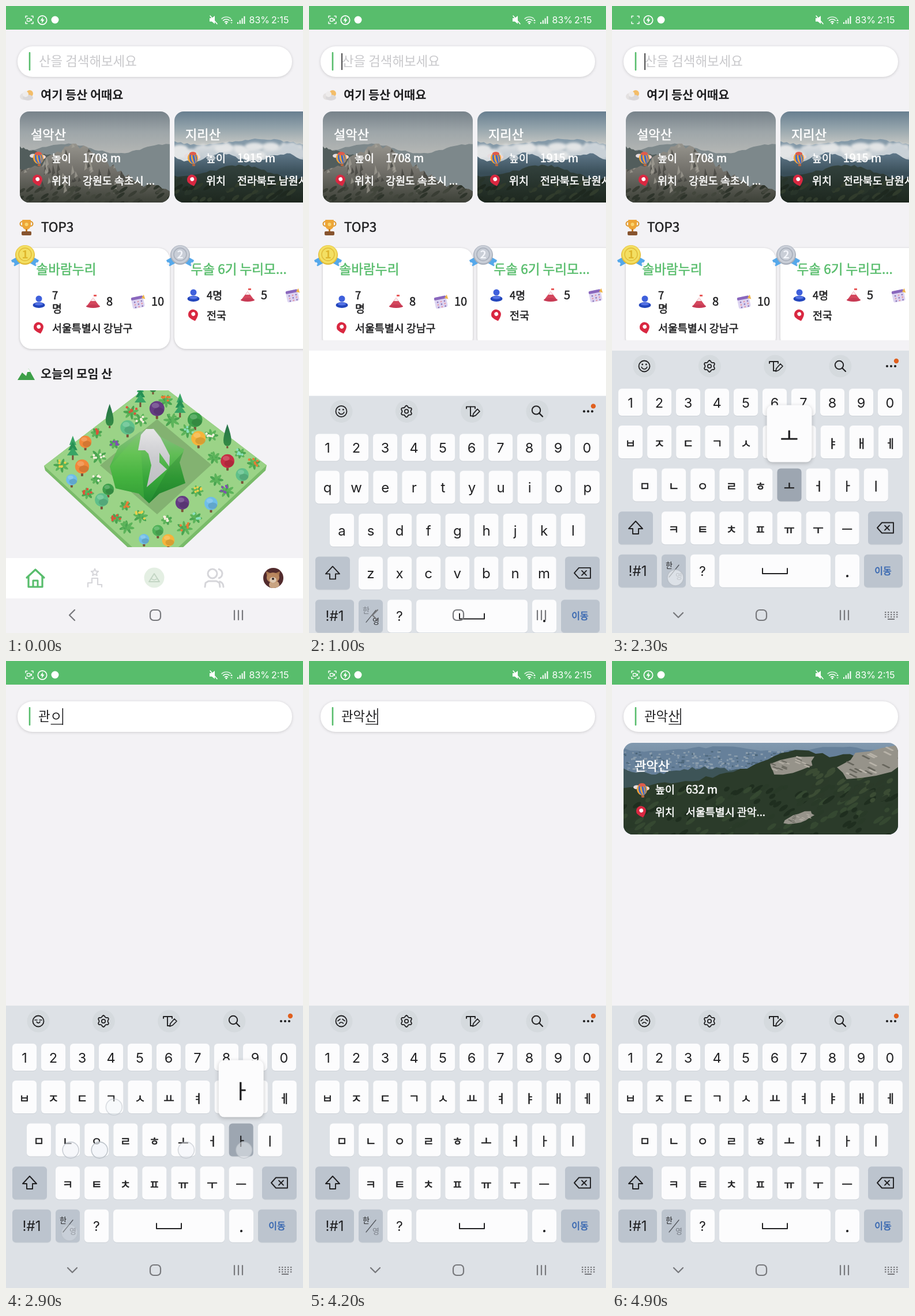
Animation of 515 by 1088 pixels, one loop 5000 ms. Source, as an HTML page with a canvas:

```html
<!DOCTYPE html>
<html lang="ko">
<head>
<meta charset="utf-8">
<title>산 검색</title>
<style>
html, body { margin: 0; width: 100%; height: 100%; overflow: hidden; background: #f3f2f5; }
canvas { display: block; width: 515px; height: 1088px; }
</style>
</head>
<body>
<canvas id="stage"></canvas>
<script>
const W = 515, H = 1088, LOOP = 5000, STEP = 100;
const cv = document.getElementById('stage'), g = cv.getContext('2d');
const dpr = window.devicePixelRatio || 1;
cv.width = W * dpr; cv.height = H * dpr;

const KR = '"Noto Sans CJK KR","Noto Sans CJK",sans-serif', LAT = 'Inter,"Noto Sans",sans-serif';
const BG = '#f3f2f5', GREEN = '#58bd6c', INK = '#202022', KEYBG = '#dde1e6', DARK = '#bcc4ce';

// drawing helpers
function paint(fill, stroke, w = 2) {
  if (fill) { g.fillStyle = fill; g.fill(); }
  if (stroke) { g.strokeStyle = stroke; g.lineWidth = w; g.stroke(); }
}
function path(p, close) {
  g.beginPath();
  for (let i = 0; i < p.length; i += 2) g.lineTo(p[i], p[i + 1]);
  if (close) g.closePath();
}
function poly(p, fill, stroke, w) { path(p, true); paint(fill, stroke, w); }
function line(p, color, w) { path(p); paint(null, color, w); }
function dot(x, y, r, fill, stroke, w) { g.beginPath(); g.arc(x, y, r, 0, 7); paint(fill, stroke, w); }
function oval(x, y, rx, ry, fill, rot = 0) { g.beginPath(); g.ellipse(x, y, rx, ry, rot, 0, 7); paint(fill); }
function arc(x, y, r, a, b, color, w) { g.beginPath(); g.arc(x, y, r, a, b); paint(null, color, w); }
function box(x, y, w, h, r, fill, stroke, lw) { g.beginPath(); g.roundRect(x, y, w, h, r); paint(fill, stroke, lw); }
// closed outline from a radius per angle, starting at the top
function radial(x, y, n, radius) {
  const p = [];
  for (let i = 0; i < n; i++) {
    const a = i / n * 2 * Math.PI, r = radius(i, a);
    p.push(x + r * Math.sin(a), y - r * Math.cos(a));
  }
  return p;
}
// weight 500 is the regular face, slightly thickened
function text(s, x, y, size, color, weight = 400, font = KR, align = 'left') {
  g.font = `${weight === 500 ? 400 : weight} ${size}px ${font}`; g.fillStyle = color; g.textAlign = align; g.fillText(s, x, y);
  if (weight === 500) { g.strokeStyle = color; g.lineWidth = 0.55; g.strokeText(s, x, y); }
}
const label = (s, x, y, size, weight, font, color = INK) => text(s, x, y, size, color, weight, font, 'center');
function fade(y0, y1, ...colors) {
  const gr = g.createLinearGradient(0, y0, 0, y1);
  colors.forEach((c, i) => gr.addColorStop(i / (colors.length - 1), c));
  return gr;
}
function shadowed(blur, dy, alpha, fn) {
  g.save(); g.shadowColor = `rgba(0,0,0,${alpha})`; g.shadowBlur = blur * dpr; g.shadowOffsetY = dy * dpr; fn(); g.restore();
}
function clipped(x, y, w, h, r, fn) {
  g.save(); g.beginPath(); g.roundRect(x, y, w, h, r); g.clip(); fn(); g.restore();
}
function at(x, y, fn, rot = 0) { g.save(); g.translate(x, y); g.rotate(rot); fn(); g.restore(); }
function rng(seed) { return () => (seed = (seed * 16807) % 2147483647) / 2147483647; }
const bump = (u, mid, width) => Math.exp(-(((u - mid) / width) ** 2));

// small colour icons, centred
function pin(x, y) {
  at(x, y, () => {
    g.beginPath(); g.arc(0, -2, 8.5, Math.PI * 0.88, Math.PI * 0.12); g.quadraticCurveTo(6, 5, 0, 10); g.quadraticCurveTo(-6, 5, -8, 1);
    paint('#d92841'); dot(0.5, -2.5, 3.4, '#fff');
  }, -0.3);
}
function balloon(x, y) {
  at(x, y, () => {
    oval(-8, -5, 6, 3.5, '#e6dcdf'); oval(9, -3, 5, 3.5, '#f0d6d0');
    for (let i = 0; i < 4; i++) oval(1 + i * 0.6, -1, 9 - i * 2.4, 10, i % 2 ? '#4169c6' : '#f0a338', -0.2);
    oval(1, -9, 6, 3, '#e05c4b'); box(0, 9, 5, 4, 1, '#b3653f');
  });
}
function person(x, y) {
  dot(x, y - 5, 5.5, '#3f60dc'); oval(x, y + 6, 10.5, 5, '#2346bc'); oval(x, y + 4, 7, 2.5, '#5573e6');
}
function peak(x, y) {
  poly([x - 12, y + 9, x, y - 7, x + 12, y + 9], '#d4475d'); oval(x, y + 8, 12, 3, '#c73a54');
  poly([x - 4, y - 1, x, y - 7, x + 4, y - 1], '#fbe9ec'); box(x + 1, y - 12, 5, 3, 0, '#e85b5b');
}
function calendar(x, y) {
  at(x, y, () => {
    box(-11, -9, 21, 20, 3, '#ddd4f1'); box(-11, -9, 21, 5, 2, '#8a67bd');
    for (let i = 0; i < 9; i++) dot(-6 + (i % 3) * 6, (i / 3 | 0) * 4.5, 1.4, i % 2 ? '#e59ba9' : '#8d79ba');
    poly([7, -5, 12, -10, 13, -2], '#eeb54a');
  }, -0.2);
}
function medal(x, color, rim, ink, n) {
  for (const s of [-1, 1]) at(x + s * 13, 443, () => { box(-9, -7, 18, 12, 1, '#55a8ea'); dot(s * 9, 0, 2.5, BG); }, s * 0.5);
  dot(x, 432, 17, rim); dot(x, 431, 15.5, color); dot(x, 431, 11, null, rim, 1.5);
  label(n, x, 438, 19, 700, KR, ink);
}
function headIcons() {
  dot(41, 152, 6, '#f3bd69'); oval(31, 157, 7, 6, '#e4e1e1'); oval(38, 159, 9, 5, '#dad8da'); dot(34, 153, 5, '#eeecec');
  for (const s of [-1, 1]) dot(35.5 + s * 7, 378, 4, null, '#dc962c', 2);
  box(28, 371, 15, 17, [1, 1, 8, 8], '#eda536'); box(34, 387, 3, 6, 0, '#c57b22'); box(27, 391, 17, 7, 2, '#87542f'); dot(35.5, 379, 3, '#f9d46f');
  poly([20, 649, 28, 636, 35, 642, 39, 629, 50, 649], '#3d9f48'); poly([36, 635, 39, 629, 42, 635], '#fff');
}

// landscape pictures
function hill(x, w, bottom, seed, jag, fill, height) {
  const r = rng(seed), p = [x, bottom], n = 40;
  for (let i = 0; i <= n; i++) p.push(x + w * i / n, height(i / n) + (r() - 0.5) * jag);
  poly([...p, x + w, bottom], fill);
  path([...p, x + w, bottom], true);
}
function specks(x, y, w, h, n, size, colors, seed, rot = -0.6) {
  const r = rng(seed);
  for (let i = 0; i < n; i++) oval(x + r() * w, y + r() * h, size * (0.6 + r()), size * 0.45, colors[i % colors.length], rot);
}
function rockView() {
  box(24, 183, 260, 158, 0, fade(183, 255, '#77828a', '#9ea6a9', '#b4b6b4'));
  hill(24, 260, 341, 7, 3, '#7d888b', u => 247 + 8 * Math.sin(u * 9 + 2));
  hill(24, 130, 341, 12, 5, '#525d5c', u => 246 + u * 34);
  g.save();
  hill(24, 260, 341, 40, 13, fade(236, 341, '#98968f', '#706e68', '#3c4037'), u => 297 + 20 * u - 62 * bump(u, 0.39, 0.27));
  g.clip();
  const r = rng(31);
  for (let i = 0; i < 75; i++) {
    const x = 24 + r() * 200, y = 236 + r() * 75, h = 6 + r() * 16;
    poly([x, y, x + 4, y + h * 0.7, x - 2, y + h], i % 2 ? 'rgba(62,62,58,.65)' : 'rgba(172,168,158,.6)');
  }
  specks(24, 312, 260, 34, 55, 6, ['#2e342b', '#42463c', '#393d34'], 5);
  g.restore();
}
function cloudView() {
  box(292, 183, 223, 158, 0, fade(183, 240, '#687f90', '#93a3ab', '#c4c6c3'));
  hill(292, 223, 341, 4, 3, '#8499a8', u => 236 + 5 * Math.sin(u * 7));
  g.save(); g.filter = 'blur(2px)';
  hill(292, 223, 341, 15, 7, fade(238, 275, '#dde0e2', '#b4c1ca'), u => 244 + 6 * Math.sin(u * 11 + 1));
  specks(292, 244, 223, 20, 24, 16, ['#c9d1d7', '#e3e5e6'], 22, 0);
  g.restore();
  hill(292, 223, 341, 19, 4, fade(255, 290, '#60788a', '#394e58'), u => 263 + 7 * Math.sin(u * 13));
  hill(292, 223, 341, 27, 4, fade(272, 341, '#34433f', '#1d271e'), u => 297 - 24 * bump(u, 0.52, 0.28) + 6 * u);
  specks(292, 302, 223, 40, 50, 7, ['#1e281f', '#303b2c', '#28342a'], 14);
}
function boulder(x, y, rx, ry, seed) {
  const r = rng(seed);
  at(x, y, () => {
    g.scale(rx, ry);
    poly(radial(0, 0, 14, () => 0.7 + r() * 0.4), '#96938a');
    for (let i = 0; i < 16; i++) {
      const a = r() * 1.4 - 0.8, b = r() * 1.2 - 0.7;
      line([a, b, a + 0.15, b + 0.3], i % 2 ? '#67665d' : '#b8b3a9', 0.06);
    }
  }, -0.25);
}
function cityView() {
  box(20, 142, 476, 159, 0, fade(142, 210, '#8299af', '#728ba1', '#566d79'));
  hill(20, 476, 301, 6, 4, '#66809a', u => 153 + 4 * Math.sin(u * 14));
  const r = rng(77);
  for (let i = 0; i < 260; i++) box(20 + r() * 300, 155 + r() * 46, 2 + r() * 4, 1.5 + r() * 2, 0, i % 3 ? '#8c9ead' : '#4c667a');
  hill(20, 280, 301, 10, 7, '#3d5457', u => 190 + 5 * Math.sin(u * 9));
  hill(20, 476, 301, 23, 7, '#2b3b2a', u => 224 - 70 * u - 24 * bump(u, 0.6, 0.14));
  specks(20, 218, 476, 90, 150, 8, ['#1f2e1f', '#354831', '#293a28'], 3);
  specks(330, 182, 166, 60, 40, 8, ['#2b3a29', '#3b4c34'], 9);
  boulder(310, 180, 46, 17, 8); boulder(452, 175, 62, 27, 17); boulder(325, 272, 28, 10, 5);
}
function facts(x, y, name, height, place, tx = 54) {
  text(name, x, y, 22.1, '#fff', 500);
  balloon(x + 12, y + 34); pin(x + 12, y + 72);
  [['높이', height], ['위치', place]].forEach(([k, v], i) => {
    text(k, x + 36, y + 40 + i * 39, 18.4, '#fff', 500);
    text(v, x + 36 + tx, y + 40 + i * 39, i ? 18.4 : 19.6, '#fff', 500);
  });
}

// garden: three square rings of plants around the crystal hill
function tree(x, y, r, c) {
  box(x - 2, y + r * 0.5, 4, r * 0.9, 1, '#7b5138');
  dot(x, y, r, c); oval(x + r * 0.25, y + r * 0.35, r * 0.7, r * 0.5, 'rgba(0,0,0,.12)'); oval(x - r * 0.2, y - r * 0.4, r * 0.5, r * 0.35, 'rgba(255,255,255,.18)');
}
function cone(x, y, h) {
  box(x - 1.5, y, 3, 4, 0, '#7b5138');
  g.beginPath(); g.moveTo(x, y - h); g.quadraticCurveTo(x + h * 0.36, y, x, y); g.quadraticCurveTo(x - h * 0.36, y, x, y - h);
  paint(fade(y - h, y, '#26734a', '#338b43'));
}
function pine(x, y) {
  box(x - 1.5, y - 5, 3, 9, 0, '#7b5138');
  for (let i = 0; i < 3; i++) poly([x, y - 38 + i * 10, x + 6 + i * 2, y - 22 + i * 9, x - 6 - i * 2, y - 22 + i * 9], i % 2 ? '#279054' : '#38a565');
}
function plant(x, y, r, bloom, rand) {
  for (let i = 0; i < 7; i++) { const a = i * 0.9 + r; oval(x + Math.cos(a) * r * 0.5, y + Math.sin(a) * r * 0.4, r * 0.55, 2.4, i % 2 ? '#4aa551' : '#5cb45a', a); }
  for (let i = 0; i < 6; i++) dot(x + (rand() - 0.5) * r * 1.4, y + (rand() - 0.7) * r, 2.1, bloom);
}
const CROWNS = ['#3c9e4a', '#f1883a', '#5fc08a', '#653c83', '#4eb157', '#6fbee9', '#f6b43b', '#c62d44'];
const BLOOMS = ['#5cb45a', '#e77b36', '#8050b0', '#ecd04c', '#8be0bd', '#dd523a', '#f6f0dc'];
function garden() {
  poly([66, 798, 259, 650, 452, 797, 450, 806, 259, 984, 68, 806], '#79bb69');
  poly([66, 798, 259, 650, 452, 797, 259, 976], '#9bd387');
  poly([163, 797, 262, 717, 356, 796, 262, 882], '#83b271');
  const rand = rng(4), spots = [];
  for (const [size, n] of [[0.88, 28], [0.66, 20]]) for (let i = 0; i < n; i++) {
    const side = Math.floor(i * 4 / n), k = (i * 4 / n % 1) * 2 - 1;
    const turn = [[k, -1], [1, k], [-k, 1], [-1, -k]][side].map(v => v * size + (rand() - 0.5) * 0.08);
    const v = (turn[0] + turn[1]) / 2;
    spots.push({ x: 259 + 96.5 * (turn[0] - turn[1]), y: 798 + v * (v < 0 ? 148 : 178), kind: i % 5, back: side % 3 === 0 && size > 0.8 });
  }
  spots.sort((a, b) => a.y - b.y).forEach(({ x, y, kind, back }, i) => {
    if (kind === 0 && back) cone(x, y + 5, 38);
    else if (kind === 2 && back) pine(x, y + 5);
    else if (kind % 3 === 0) tree(x, y - 5, 9 + rand() * 4, CROWNS[i % CROWNS.length]);
    else plant(x, y, 9 + rand() * 5, BLOOMS[i % BLOOMS.length], rand);
  });
  const rock = [180, 799, 195, 765, 232, 739, 256, 733, 269, 748, 309, 769, 301, 792, 311, 828, 266, 846, 248, 863, 230, 846, 190, 837];
  poly(rock, fade(735, 860, '#8fbd8a', '#62bd57', '#38a83a', '#238c31'));
  g.save(); path(rock, true); g.clip();
  poly([180, 799, 232, 739, 240, 863, 190, 837], 'rgba(110,215,80,.22)');
  poly([283, 800, 320, 760, 311, 840, 248, 863], 'rgba(10,80,25,.18)');
  g.restore();
  poly([229, 771, 234, 744, 243, 734, 256, 734, 268, 749, 284, 780, 283, 799, 266, 775, 266, 792, 279, 804, 244, 835, 252, 797, 247, 777, 241, 771], fade(734, 835, '#e6e6e7', '#cbcbcf', '#bebfc2'));
}

function statusBar(t) {
  box(0, 0, W, 41, 0, GREEN);
  for (const a of [-1, 1]) for (const b of [-1, 1]) line([40.5 + a * 6.5, 24 + b * 3.5, 40.5 + a * 6.5, 24 + b * 6.5, 40.5 + a * 3.5, 24 + b * 6.5], '#fff', 1.4);
  const m = t % 1000;
  if (m < 300 || m >= 800) { box(36.5, 21.5, 5.5, 5, 1, null, '#fff', 1.3); poly([43, 23, 45, 21.5, 45, 26.5, 43, 25], '#fff'); }
  dot(63, 24.5, 7.7, null, '#fff', 1.7); poly([64, 19, 59.5, 25.5, 62.5, 25.5, 62, 30, 66.5, 23.5, 63.5, 23.5], '#fff');
  dot(85, 24, 6.5, '#fff');
  poly([353, 21, 357, 21, 362, 17, 362, 31, 357, 27, 353, 27], '#fff'); line([354, 17, 366, 31], '#fff', 1.6);
  for (const r of [4, 8, 12]) arc(382, 31, r, -2.3, -0.85, r < 12 ? '#fff' : 'rgba(255,255,255,.75)', 1.6);
  dot(382, 30, 1.6, '#fff'); poly([389, 26, 391, 23, 393, 26], '#fff'); poly([389, 28, 391, 31, 393, 28], 'rgba(255,255,255,.6)');
  for (let i = 0; i < 4; i++) box(401 + i * 3.8, 28 - i * 3.4, 2, 3 + i * 3.4, 0.5, '#fff');
  text('83%', 421.5, 29.5, 16, '#fff', 400, LAT); text('2:15', 460, 29.5, 16, '#fff', 400, LAT);
}

function club(x, name, members, peaks, days, place) {
  const rows = members.length, y = 491 + rows * 11, low = y + 24 + rows * 11;
  shadowed(4, 1, 0.2, () => box(x, 420, 260, 175, 20, '#fff'));
  text(name, x + 28.5, 465, 22.6, GREEN, 500);
  members.forEach((s, i) => text(s, x + 56, y + 7 + (i * 2 - rows + 1) * 11.5, 18.4, INK, 500));
  person(x + 33, y); peak(x + 127, y); calendar(x + 205, y); pin(x + 33, low);
  text(peaks, x + 150, y + 7, 20, INK, 500); text(days, x + 228, y + 7, 20, INK, 500);
  text(place, x + 56, low + 6.5, 18.4, INK, 500);
}
function home(full) {
  g.save();
  g.beginPath(); g.rect(0, 130, W, full ? 828 : 450); g.clip();
  headIcons();
  text('여기 등산 어때요', 60, 162, 20.8, INK, 700);
  clipped(24, 183, 260, 158, 16, rockView); clipped(292, 183, 260, 158, 16, cloudView);
  facts(43, 231, '설악산', '1708 m', '강원도 속초시 ...'); facts(311, 231, '지리산', '1915 m', '전라북도 남원시 ...');
  text('TOP3', 61, 392, 22.5, INK, 500);
  club(24, '솔바람누리', ['7', '명'], '8', '10', '서울특별시 강남구');
  club(292, '두솔 6기 누리모...', ['4명'], '5', '12', '전국');
  medal(33, '#f3df62', '#e3bd3a', '#dfb62d', '1'); medal(302, '#c9ced7', '#a8afbb', '#f3f5fa', '2');
  if (full) { text('오늘의 모임 산', 60, 646, 20.8, INK, 700); clipped(60, 667, 400, 272, 0, garden); }
  g.restore();
}

function tabs() {
  const c = '#d6d6da';
  box(0, 958, W, 70, 0, '#fff');
  line([36, 992, 51, 978, 66, 992], GREEN, 3.2); line([39, 990, 39, 1008, 63, 1008, 63, 990], GREEN, 3.2); line([47, 1007, 47, 997, 55, 997, 55, 1007], GREEN, 3);
  poly(radial(154, 983, 10, i => i % 2 ? 3 : 6.5), null, c, 2);
  line([142, 1008, 142, 1001, 149, 1001, 149, 993, 159, 993, 159, 1004, 166, 1004, 166, 1008], c, 2.2);
  dot(257, 992, 17.5, '#e4efe3'); poly([248, 999, 257, 985, 266, 999], null, '#c3d5c4', 2); line([252, 994, 257, 996, 262, 994], '#c3d5c4', 1.4);
  dot(358, 985, 8, null, c, 3); line([345, 1008, 346, 1001, 351, 998, 365, 998, 370, 1001, 371, 1008], c, 3);
  arc(367, 985, 8, -1.3, 1.3, c, 3); arc(367, 1008, 10, -1.2, 0, c, 3);
  clipped(446, 975, 35, 35, 17.5, () => {
    box(446, 975, 35, 35, 0, '#522b2d'); oval(465, 1004, 9, 7, '#c9a482');
    for (const s of [-1, 1]) poly([463 + s * 12, 981, 463 + s * 10, 992, 463, 986], '#a8754f');
    oval(463, 992, 11, 9, '#b9875f'); oval(463, 996, 6, 5, '#ddc7b0'); dot(463, 994, 2, '#352a2a');
  });
}
function navIcons(kb) {
  const c = '#77787c';
  if (kb) {
    line([107, 1053, 115, 1061, 123, 1053], c, 2.3);
    for (let i = 0; i < 15; i++) box(473 + (i % 5) * 5, 1051 + (i / 5 | 0) * 4, 2.4, 2.2, 0, c);
    box(478, 1063, 12, 2, 0, c);
  } else line([119, 1048, 110, 1057, 119, 1066], c, 2.3);
  box(250, 1048, 18, 18, 6, null, c, 2.2);
  for (let i = 0; i < 3; i++) line([396 + i * 7, 1049, 396 + i * 7, 1065], c, 2.2);
}

// keyboard
const EN = ['qwertyuiop', 'asdfghjkl', 'zxcvbnm'], KO = ['ㅂㅈㄷㄱㅅㅛㅕㅑㅐㅔ', 'ㅁㄴㅇㄹㅎㅗㅓㅏㅣ', 'ㅋㅌㅊㅍㅠㅜㅡ'];
const PITCH = 50.1, rowX = r => [11, 36, 86][r], rowY = r => 728 + r * 74.6;
const LAG = 200, FOCUS = 700, SWITCH = 2000, RESULT = 4600;
const stages = 'ㄱ 고 과 관 관ㅇ 관아 관악 관악ㅅ 관악사 관악산'.split(' ');
// typing slows down a little with every key
const taps = [...'ㄱㅗㅏㄴㅇㅏㄱㅅㅏㄴ'].map((ch, i) => ({ ch, out: stages[i], start: 2200 + STEP * Math.floor(0.9 * i + 0.1 * i * i) }));
function keyPos(ch) {
  const r = KO.findIndex(s => s.includes(ch));
  return { x: rowX(r) + KO[r].indexOf(ch) * PITCH, y: rowY(r) };
}
function key(x, y, w, h, fill = '#fcfcfd') { box(x, y + 1, w, h, 6, '#cdd2d8'); box(x, y, w, h, 6, fill); }
function toolbar(t) {
  for (let i = 0; i < 4; i++) dot(56 + i * 113.3, 625, 19.5, '#d5dade');
  dot(56, 625, 9.5, null, INK, 1.8);
  const happy = t < 2400, sad = t >= 3300, tilt = sad ? 1.5 : 0;
  for (const s of [-1, 1]) happy ? dot(56 + s * 3.3, 622, 1.4, INK) : line([56 + s * 2, 623 - tilt, 56 + s * 6, 623 + tilt], INK, 1.6);
  if (sad) arc(56, 631, 4, 3.7, 5.7, INK, 1.7); else arc(56, 625, happy ? 5 : 3, 0.3, 2.8, INK, 1.7);
  poly(radial(169, 625, 32, (i, a) => 8.7 + 1.4 * Math.cos(6 * a)), null, INK, 1.8); dot(169, 625, 3.2, null, INK, 1.7);
  line([273, 620, 273, 617, 288, 617, 288, 620], INK, 1.9); line([280, 617, 280, 633, 284, 633], INK, 1.9);
  poly([284, 634, 285, 629, 292, 621, 296, 625, 289, 632], null, INK, 1.7);
  dot(394, 623, 7.2, null, INK, 2); line([399, 628, 405, 634], INK, 2.2);
  for (let i = 0; i < 3; i++) dot(477 + i * 7, 625, 2.1, INK);
  dot(493, 616, 4.2, '#e0601f');
}
function letters(korean, down) {
  (korean ? KO : EN).forEach((s, r) => [...s].forEach((c, i) => {
    const x = rowX(r) + i * PITCH, y = rowY(r);
    key(x, y, 42, 57, down && down.ch === c ? '#9da6b1' : undefined);
    if (korean) label(c, x + 21, y + 38.5, 20.5, 500, KR); else label(c, x + 21, y + 37.5, 24, 400, LAT);
  }));
}
function bottomRows(korean) {
  const y = rowY(3), soft = '#777c84';
  key(11, rowY(2), 60, 57, DARK); key(444, rowY(2), 60, 57, DARK);
  poly([41, 894, 53, 907, 46, 907, 46, 916, 36, 916, 36, 907, 29, 907], null, INK, 1.9);
  poly([460, 905.5, 468, 896.5, 488, 896.5, 488, 914.5, 468, 914.5], null, INK, 1.9);
  for (const s of [-1, 1]) line([477 - 4 * s, 901.5, 477 + 4 * s, 909.5], INK, 1.8);
  key(11, y, 67, 57, DARK); key(86, y, 42, 57, DARK); key(136, y, 42, 57); key(186, y, 193, 57); key(387, y, 42, 57); key(437, y, 67, 57, DARK);
  label('!#1', 44.5, 989, 24, 400, LAT); label('?', 157, 989, 23, 400, LAT); label('.', 408, 991, 28, 500, LAT);
  label('한', 99, 975, 13, 400, KR, korean ? INK : soft); label('영', 116, 994, 13, 400, KR, korean ? soft : INK);
  line([99, 991, 116, 970], '#50545a', 1.2);
  line([261, 976, 261, 985, 304, 985, 304, 976], INK, 2);
  label('이동', 470, 986, 16, 500, KR, '#3465b0');
}
function keyboard(t) {
  const korean = t >= SWITCH, down = taps.find(k => t >= k.start && t < k.start + STEP);
  box(0, 598, W, 490, 0, KEYBG);
  toolbar(t);
  [...'1234567890'].forEach((c, i) => { key(11 + i * 50, 664, 42, 47); label(c, 32 + i * 50, 697, 23.5, 400, LAT); });
  letters(korean, down);
  bottomRows(korean);
  if (down) {
    const k = keyPos(down.ch);
    shadowed(7, 2, 0.22, () => box(k.x - 18, k.y - 110, 78, 99, 10, '#fcfcfd'));
    label(down.ch, k.x + 21, k.y - 44, 34, 500, KR);
  }
  // touch marks fade after the finger lifts
  if (t < taps[9].start + 300) for (const { ch, start } of [{ start: SWITCH }, ...taps]) {
    const age = t - start, k = ch ? keyPos(ch) : { x: 84, y: 946 };
    if (age < LAG || age >= 1000) continue;
    g.globalAlpha = 1 - age / 1300; dot(k.x + 26, k.y + 46, 14, 'rgba(240,243,247,.8)', '#b4bac2', 1.6); g.globalAlpha = 1;
  }
}

function search(t) {
  shadowed(5, 1, 0.16, () => box(20, 70, 476, 53, 26, '#fff'));
  box(39.7, 80, 2.6, 32, 1, GREEN);
  let typed = '', last = FOCUS;
  for (const { start, out } of taps) { if (t >= start + LAG) typed = out; if (t >= start) last = start; }
  const step = 20.6, end = 57 + typed.length * step;
  if (typed) { text(typed, 56, 104, 22.4, INK); box(end - step, 109, step, 1.3, 0, INK); }
  else text('산을 검색해보세요', 57, 103.5, 22.4, '#c9c9cc');
  if (t >= FOCUS && Math.floor((t - last) / 500) % 2 === 0) box(end - 0.7, 82, 1.6, 29, 0, INK);
  return typed;
}

function draw(t) {
  g.setTransform(dpr, 0, 0, dpr, 0, 0);
  g.lineCap = g.lineJoin = 'round';
  box(0, 0, W, H, 0, BG);
  statusBar(t);
  const open = t > FOCUS, typed = search(t);
  if (!typed) home(!open);
  if (t >= RESULT) {
    clipped(20, 142, 476, 159, 16, cityView);
    facts(39, 190, '관악산', '632 m', '서울특별시 관악...', 53);
  }
  if (!open) { tabs(); navIcons(false); return; }
  const left = Math.max(0, 1 - (t - FOCUS) / 500);
  box(0, 598, W, 490, 0, '#fff');
  at(0, 490 * left * left, () => keyboard(t));
  navIcons(left === 0);
}

let shown = -1;
const start = performance.now();
function tick() {
  const t = Math.floor(((performance.now() - start) % LOOP) / STEP) * STEP;
  if (t !== shown) draw(shown = t);
  requestAnimationFrame(tick);
}
tick();
</script>
</body>
</html>
```
